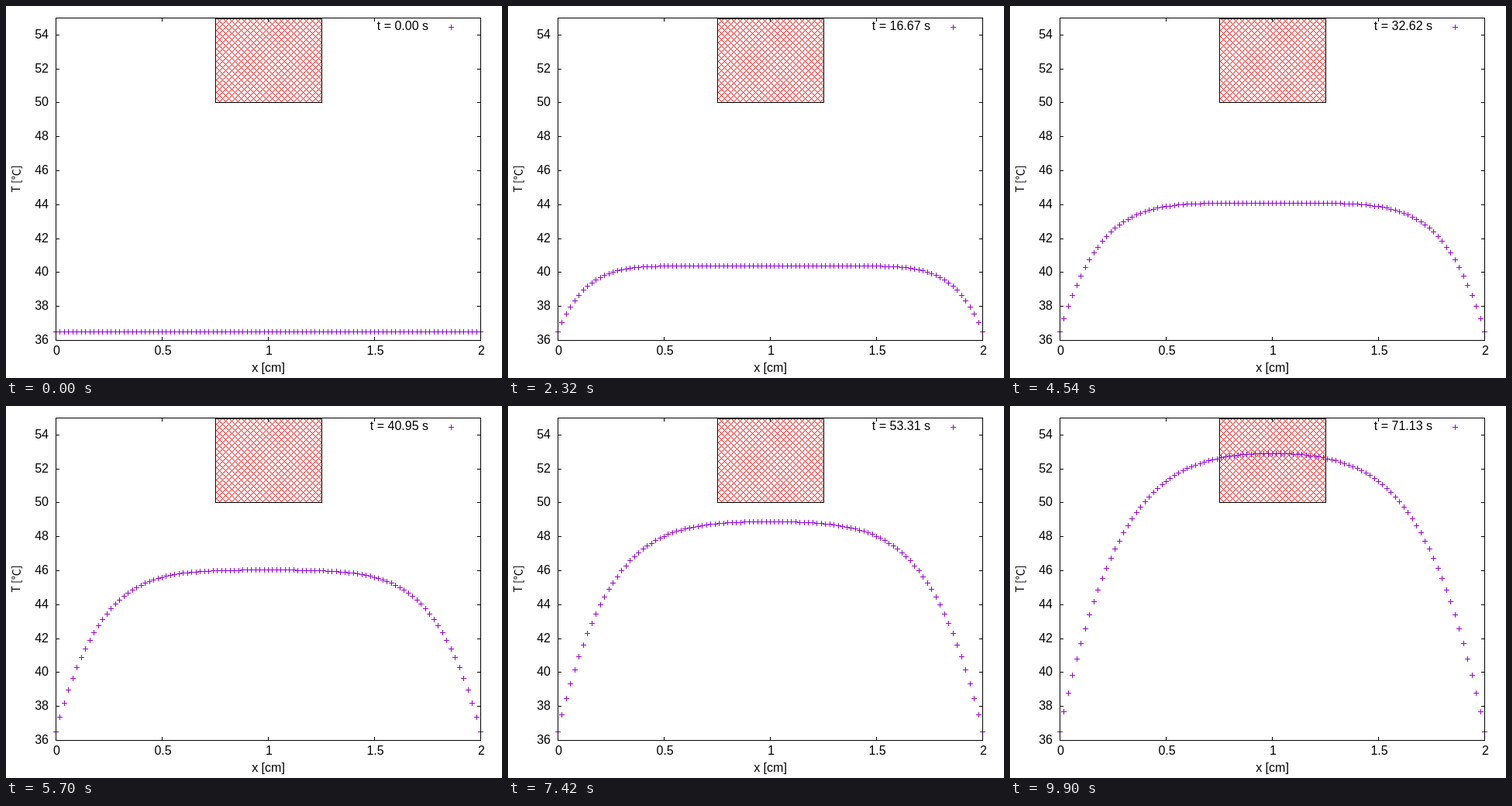
Animation of 640 by 480 pixels, one loop 9920 ms. Source, as an HTML page with a canvas:

```html
<!DOCTYPE html>
<html lang="en">
<head>
<meta charset="utf-8">
<title>Heating of a slab</title>
<style>
html, body { margin: 0; width: 100%; height: 100%; overflow: hidden; background: #fff; }
canvas { display: block; }
</style>
</head>
<body>
<canvas id="plot" width="640" height="480"></canvas>
<script>
const ctx = document.getElementById('plot').getContext('2d');
const LEFT = 64, RIGHT = 612, TOP = 15, BOTTOM = 431;
const STEP_MS = 20, STEPS = 496, STEP_SECONDS = 0.1437;
const DIFFUSIVITY = 0.00135, HEATING = 0.233, START = 36.5;
const FONT = '16px "Liberation Sans", Arial, sans-serif';

const px = x => Math.round(LEFT + x * (RIGHT - LEFT) / 2);
const py = temp => Math.round(BOTTOM - (temp - 36) * (BOTTOM - TOP) / 19);

function rect(color, x, y, w, h) {
  ctx.fillStyle = color;
  ctx.fillRect(x, y, w, h);
}

function frame(x0, y0, x1, y1) {
  ctx.strokeStyle = '#000';
  ctx.strokeRect(x0 + 0.5, y0 + 0.5, x1 - x0, y1 - y0);
}

function text(str, x, y, align) {
  ctx.fillStyle = '#000';
  ctx.font = FONT;
  ctx.textAlign = align;
  ctx.fillText(str, x, y);
}

function plus(x, y) {
  rect('#9400d3', x - 3, y, 7, 1);
  rect('#9400d3', x, y - 3, 1, 7);
}

// Uniformly heated slab, 2 cm wide, with both faces held at START
function temperature(x, t) {
  let sum = 0;
  for (let n = 1; n < 80; n += 2) {
    const k = n * Math.PI / 2, rate = DIFFUSIVITY * k * k;
    sum += 4 * HEATING / (n * Math.PI * rate) * (1 - Math.exp(-rate * t)) * Math.sin(k * x);
  }
  return START + sum;
}

function drawZone() {
  const x0 = px(0.75), x1 = px(1.25), y0 = TOP, y1 = py(50);
  for (let y = y0; y < y1; y++)
    for (let x = x0; x < x1; x++)
      if ((x - y) % 8 === 0 || (x + y) % 8 === 6) rect('#f00', x, y, 1, 1);
  frame(x0, y0 + 1, x1, y1);
}

function drawAxes() {
  frame(LEFT, TOP, RIGHT, BOTTOM);
  for (let temp = 36; temp < 55; temp += 2) {
    const y = py(temp);
    rect('#000', LEFT, y, 5, 1);
    rect('#000', RIGHT - 4, y, 5, 1);
    text(temp, 55, y + 5, 'right');
  }
  for (let value = 0; value <= 2; value += 0.5) {
    const x = px(value);
    rect('#000', x, TOP, 1, 5);
    rect('#000', x, BOTTOM - 4, 1, 5);
    text(value, x + 1.5, 450, 'center');
  }
  text('x [cm]', 338.5, 472, 'center');
  ctx.save();
  ctx.translate(18, 223);
  ctx.rotate(-Math.PI / 2);
  ctx.font = '14px "Noto Sans CJK JP", "Noto Sans", sans-serif';
  ctx.textAlign = 'center';
  ctx.fillText('T [℃]', 0, 0);
  ctx.restore();
}

function draw(t) {
  rect('#fff', 0, 0, 640, 480);
  drawZone();
  for (let i = 0; i <= 100; i++) plus(px(i / 50), py(temperature(i / 50, t)));
  drawAxes();
  text(`t = ${t.toFixed(2)} s`, 545, 31, 'right');
  plus(574, 27);
}

let shown = -1;
function tick() {
  const step = Math.floor(performance.now() / STEP_MS) % STEPS;
  if (step !== shown) draw(step * STEP_SECONDS);
  shown = step;
  requestAnimationFrame(tick);
}
tick();
</script>
</body>
</html>
```
